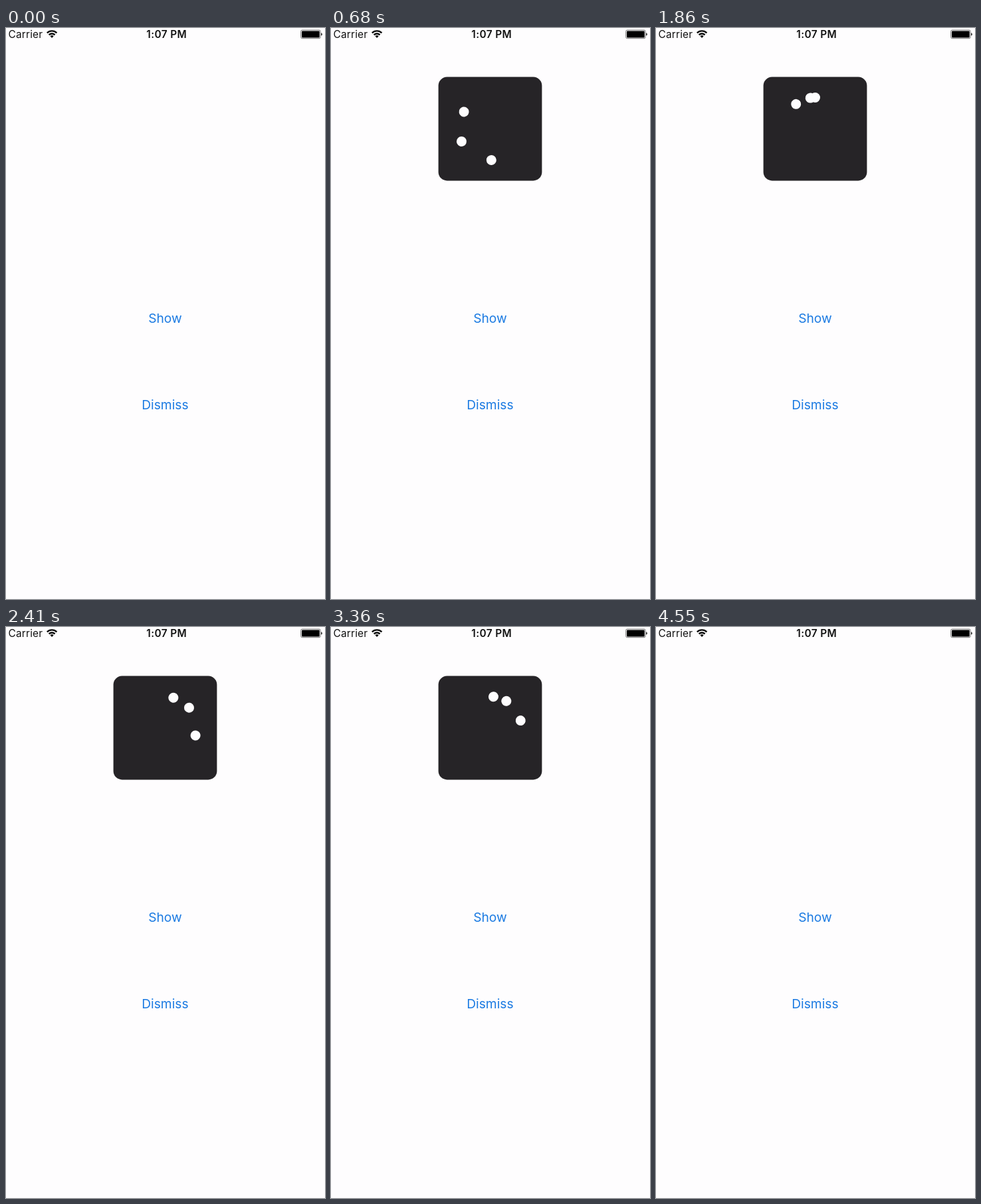
Recreate the animation shown at these times as an HTML page. Size 480 by 858 pixels, loop 4600 ms.

```html
<!DOCTYPE html>
<html lang="en">
<head>
<meta charset="utf-8">
<title>Loading indicator</title>
<style>
  html, body { margin: 0; width: 100%; height: 100%; overflow: hidden; background: #fefdfe; }
  svg { display: block; width: 480px; height: 858px; }
  text { font-family: Inter, Roboto, sans-serif; font-size: 15.4px; fill: #111; }
  .button { font-size: 19.2px; fill: #1c7be2; text-anchor: middle; }
  .clock { font-weight: 600; text-anchor: middle; letter-spacing: .4px; }
</style>
</head>
<body>
<svg viewBox="0 0 480 858">
  <text x="3.5" y="15" letter-spacing=".2">Carrier</text>
  <g fill="none" stroke="#0a0a0a" stroke-width="2.3">
    <path d="M61.8 7.4a10.2 10.2 0 0 1 14.6 0"/>
    <path d="M64.6 10.4a6.3 6.3 0 0 1 9 0"/>
    <path d="M69.1 15l-2.6-2.7a3.7 3.7 0 0 1 5.2 0z" fill="#0a0a0a" stroke="none"/>
  </g>
  <text class="clock" x="241.7" y="15">1:07 PM</text>
  <rect x="443.6" y="3.1" width="29.6" height="12.6" rx="2.2" fill="none" stroke="#777" stroke-width="1"/>
  <rect x="445" y="4.4" width="26.8" height="10" rx="1" fill="#000"/>
  <path d="M474.2 7.2q1.6.5 1.6 2.2t-1.6 2.2z" fill="#222"/>

  <text class="button" id="show" x="239.4" y="443">Show</text>
  <text class="button" id="dismiss" x="239.4" y="572.5">Dismiss</text>

  <g id="hud" opacity="0">
    <rect x="161.6" y="73.6" width="155.8" height="155.8" rx="13" fill="#262427"/>
    <g id="dots" transform="translate(239.5 151.5)" fill="#fefdfe">
      <circle cy="-47" r="7.5"/>
      <circle cy="-47" r="7.5"/>
      <circle cy="-47" r="7.5"/>
    </g>
  </g>
</svg>
<script>
const LOOP = 4600;
const SPIN = { start: 178, period: 987, turn: 695, delay: 79 };
const HUD = { show: 140, hide: 4090, fade: 250 };
const PRESS = { show: [50, 140], dismiss: [4000, 4090] };
const RECOVER = 470;

const byId = id => document.getElementById(id);
const hud = byId('hud');
const dots = [...byId('dots').children];
const clamp = v => Math.min(1, Math.max(0, v));

// Cubic ease-in-out with control points (.42, 0) and (.58, 1).
function easeInOut(x) {
  let lo = 0, hi = 1;
  for (let i = 0; i < 24; i++) {
    const s = (lo + hi) / 2;
    if (1.26 * s - .78 * s * s + .52 * s ** 3 < x) lo = s; else hi = s;
  }
  return lo * lo * (3 - 2 * lo);
}

const ramp = (t, from, length) => easeInOut(clamp((t - from) / length));

function buttonAlpha(t, [down, up]) {
  if (t < down) return 1;
  return .2 + .8 * ramp(t, up, RECOVER);
}

function dotAngle(t, i) {
  const local = t - SPIN.start - i * SPIN.delay;
  if (local < 0) return 0;
  return 360 * ramp(local % SPIN.period, 0, SPIN.turn);
}

function draw() {
  const t = performance.now() % LOOP;
  for (const id in PRESS) byId(id).setAttribute('opacity', buttonAlpha(t, PRESS[id]));
  hud.setAttribute('opacity', ramp(t, HUD.show, HUD.fade) - ramp(t, HUD.hide, HUD.fade));
  dots.forEach((dot, i) => dot.setAttribute('transform', `rotate(${dotAngle(t, i)})`));
  requestAnimationFrame(draw);
}
draw();
</script>
</body>
</html>
```
